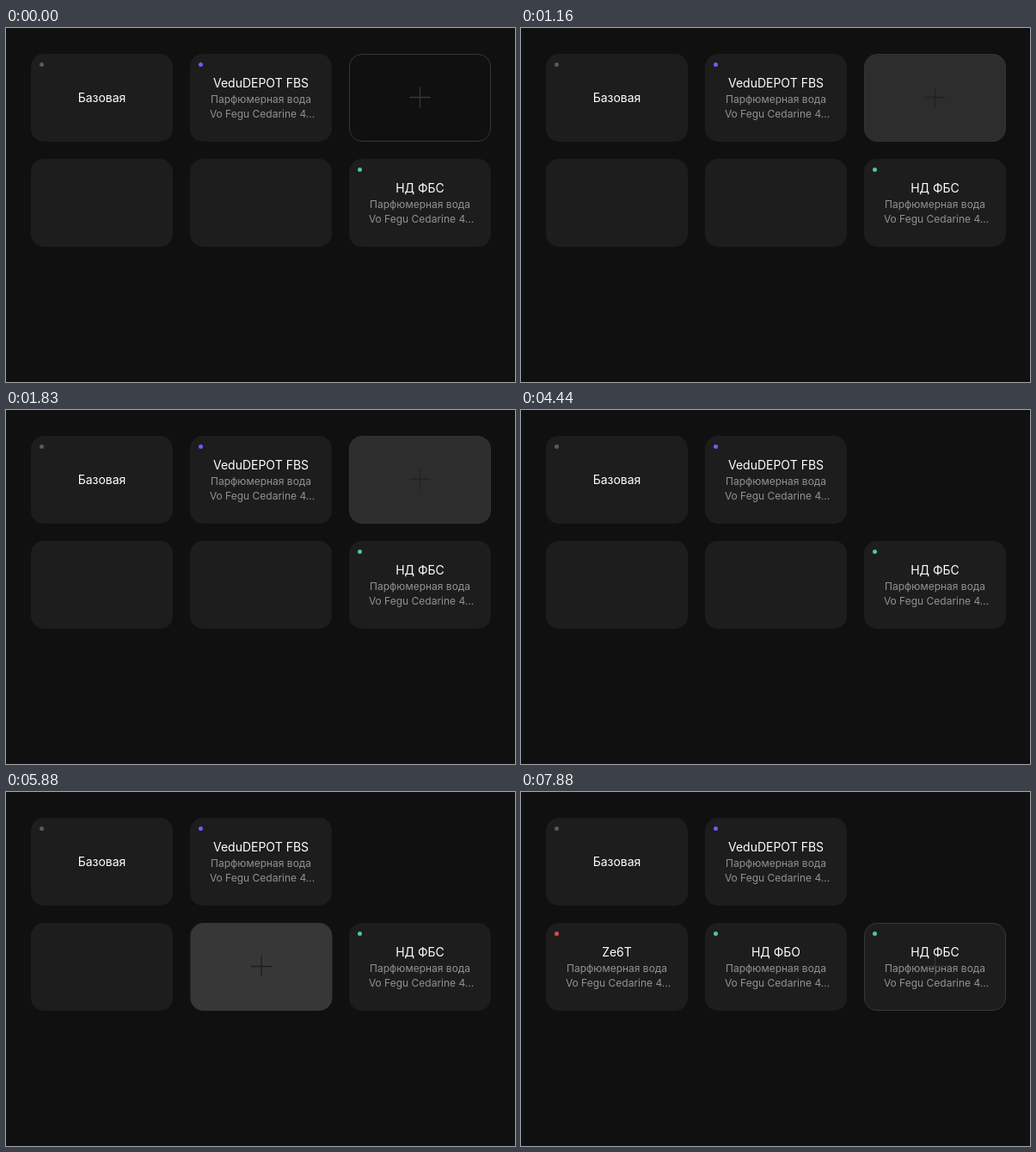
Write an HTML page that moves like this. It is 592 by 411 pixels and loops after 8.58 s.

```html
<!DOCTYPE html>
<html lang="ru">
<head>
<meta charset="utf-8">
<title>Карточки</title>
<style>
  html, body { margin: 0; width: 100%; height: 100%; overflow: hidden; background: #101010; }
  svg { display: block; width: 592px; height: 411px; }
  text { text-anchor: middle; font-family: Inter, "Open Sans", sans-serif; }
  .title { font-size: 14px; fill: #fff; }
  .sub { font-size: 12px; fill: #929292; }
</style>
</head>
<body>
<svg id="stage" viewBox="0 0 592 411"></svg>
<script>
const LOOP = 8580, W = 165, H = 102, R = 15;
const COLS = [29, 214, 399], ROWS = [30, 152];
const GREY = "#5a5a5a", VIOLET = "#735cf7", GREEN = "#4dcb8b", RED = "#e04848";
const stage = document.getElementById("stage");

function add(parent, tag, attrs, text) {
  const el = document.createElementNS("http://www.w3.org/2000/svg", tag);
  for (const key in attrs) el.setAttribute(key, attrs[key]);
  if (text) el.textContent = text;
  parent.append(el);
  return el;
}

function cell(col, row) {
  const g = add(stage, "g", { transform: `translate(${COLS[col]} ${ROWS[row]})` });
  add(g, "rect", { width: W, height: H, rx: R, fill: "#1d1d1d" });
  return g;
}

function label(card, color, title, detailed) {
  const g = add(card, "g", {});
  add(g, "circle", { cx: 12.5, cy: 12.5, r: 2.5, fill: color });
  add(g, "text", { class: "title", x: 82.5, y: detailed ? 39 : 56 }, title);
  if (detailed) {
    add(g, "text", { class: "sub", x: 82.5, y: 57 }, "Парфюмерная вода");
    add(g, "text", { class: "sub", x: 84, y: 74 }, "Vo Fegu Cedarine 4...");
  }
  return g;
}

add(stage, "rect", { width: 592, height: 411, fill: "#101010" });

label(cell(0, 0), GREY, "Базовая", false);
label(cell(1, 0), VIOLET, "VeduDEPOT FBS", true);
const added = [
  label(cell(0, 1), RED, "Ze6T", true),
  label(cell(1, 1), GREEN, "НД ФБО", true)
];
label(cell(2, 1), GREEN, "НД ФБС", true);

const slot = add(stage, "g", {});
const frame = add(slot, "rect", { x: .5, y: .5, width: W - 1, height: H - 1, rx: R - .5 });
const plus = add(slot, "path", { d: "M70.5 50.5h24M82.5 38.5v24", "stroke-width": 1.3 });

// start, slot x, slot y, fill, border, plus colour, new labels shown
const STEPS = [
  [0, 399, 30, "none", "#373737", "#373737", false],
  [1040, 399, 30, "#1d1d1d", "#333", "#2d2d2d", false],
  [1160, 399, 30, "#2d2d2d", "#333", "#222", false],
  [2280, null],
  [5880, 214.5, 152, "#373737", "#373737", "#1d1d1d", false],
  [6840, 399, 152, "none", "#373737", "#373737", true]
];

function draw(now) {
  const t = now % LOOP;
  const [, x, y, fill, border, cross, full] = STEPS.filter(s => s[0] <= t).pop();
  slot.setAttribute("visibility", x === null ? "hidden" : "visible");
  for (const g of added) g.setAttribute("visibility", full ? "visible" : "hidden");
  if (x === null) return;
  slot.setAttribute("transform", `translate(${x} ${y})`);
  frame.setAttribute("fill", fill);
  frame.setAttribute("stroke", border);
  plus.setAttribute("stroke", cross);
}

const start = performance.now();
function tick() {
  draw(performance.now() - start);
  requestAnimationFrame(tick);
}
tick();
</script>
</body>
</html>
```
